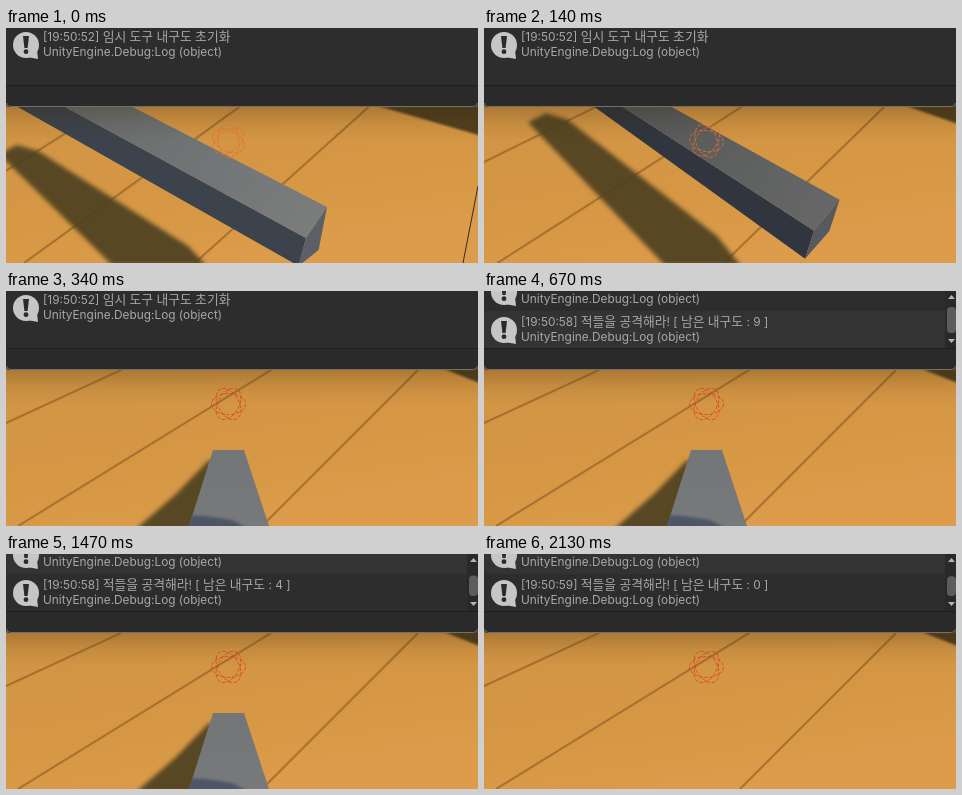
These frames come from a looping animation (472 px wide and 235 px high, 2.81 s). An HTML page with a canvas:

```html
<!DOCTYPE html>
<html lang="ko">
<head>
<meta charset="utf-8">
<style>
html, body { margin: 0; width: 100%; height: 100%; overflow: hidden; background: #2a2a2a; }
canvas { display: block; width: 472px; height: 235px; }
</style>
</head>
<body>
<canvas id="stage" width="472" height="235"></canvas>
<script>
const W = 472, H = 235, TOP = 79, LOOP = 2810;
const SWING_END = 340, BREAK = 2130;
const HIT_TIMES = [670, 880, 1070, 1270, 1470, 1660, 1860, 2010];
const DURABILITY = [9, 7, 6, 5, 4, 2, 1, 0];
const ctx = document.getElementById('stage').getContext('2d');

function poly(fill, ...pts) {
  ctx.beginPath();
  for (const [x, y] of pts) ctx.lineTo(x, y);
  ctx.closePath();
  ctx.fillStyle = fill;
  ctx.fill();
}

function line(x0, y0, x1, y1, color, width) {
  ctx.beginPath();
  ctx.moveTo(x0, y0);
  ctx.lineTo(x1, y1);
  ctx.strokeStyle = color;
  ctx.lineWidth = width;
  ctx.stroke();
}

function disc(x, y, r) {
  ctx.beginPath();
  ctx.arc(x, y, r, 0, 7);
  ctx.fill();
}

function ramp(x0, y0, x1, y1, ...colors) {
  const g = ctx.createLinearGradient(x0, y0, x1, y1);
  colors.forEach((c, i) => g.addColorStop(i / (colors.length - 1), c));
  return g;
}

function softPoly(blur, fill, ...pts) {
  ctx.save();
  ctx.filter = `blur(${blur}px)`;
  poly(fill, ...pts);
  ctx.restore();
}

// Seams squeeze towards the left as the camera turns away.
function floor(turn) {
  ctx.fillStyle = ramp(200, TOP, 225, H, '#d29545', '#d59744', '#dc9c4b');
  ctx.fillRect(0, TOP - 4, W, H - TOP + 4);
  for (const [top, bottom] of [[115, -223], [265, 12], [412, 256]]) {
    const x0 = top * (1 - turn);
    const x1 = bottom * (1 - 2.5 * turn) + 80 * turn;
    line(x0, TOP, x1, H, 'rgba(150,97,38,0.28)', 3);
    line(x0, TOP, x1, H, 'rgba(120,76,30,0.5)', 1.3);
  }
  softPoly(1, '#51401f', [438 - 550 * turn, TOP - 1], [W + 4, TOP - 1], [W + 4, 93 + 125 * turn]);
}

function windowShade() {
  ctx.fillStyle = ramp(0, TOP, 0, TOP + 34, 'rgba(50,30,0,0.24)', 'rgba(50,30,0,0.08)', 'rgba(50,30,0,0)');
  ctx.fillRect(0, TOP - 4, W, 38);
}

// p runs from 0 to 1 over the swing.
function swingBeam(p) {
  const x = 321 + 38 * p, y = 179 - 8 * p, lean = 21 + 5 * p;
  const reach = 1 / (0.000686 + 0.0016 * p * p);
  const slope = 0.515 + 0.1 * p - 0.065 * p * p;
  const vanish = [x - reach, y - reach * slope];
  const right = [x, y], ridge = [x - lean, y + 31];
  const low = [x - 1.35 * lean, y + 59], back = [x - 0.4 * lean, y + 43 - 13 * p];
  const lit = p === 0;

  const tipX = 11 + 56 * p, tipY = 117 - 35 * p;
  softPoly(2, 'rgba(78,64,33,0.92)',
    [tipX - 18, tipY + 9], [tipX, tipY], [tipX + 21, tipY + 6],
    [182 + 56 * p, 218 - 11 * p], [200 + 62 * p, 237], [106 + 82 * p, 237]);
  poly(lit ? '#3d434d' : '#30353f', ridge, low, vanish);
  poly(lit
    ? ramp(90, 79, 310, 195, '#696d6e', '#7a7d7c')
    : ramp(150, 79, 340, 190, '#565959', '#666766'), right, ridge, vanish);
  poly(lit ? '#5b6068' : '#565960', right, back, low, ridge);
}

function restBeam() {
  softPoly(2.2, 'rgba(78,64,33,0.92)', [130, 238], [170, 203], [202, 170], [212, 168], [190, 238]);
  ctx.save();
  poly(ramp(0, 159, 0, H, '#737577', '#78797b'), [207, 159], [238, 159], [263, H], [183, H]);
  ctx.clip();
  softPoly(1.5, '#4c5666', [178, 224], [200, 225], [226, 229], [245, 239], [175, 239]);
  ctx.restore();
}

function gizmo(color, spin, sweep) {
  ctx.save();
  ctx.lineWidth = 0.85;
  ctx.setLineDash([3.5, 1.6]);
  ctx.strokeStyle = color;
  for (let i = 0; i < 3; i++) {
    ctx.beginPath();
    ctx.ellipse(222.5, 113, 17, 10.5, i * Math.PI / 3 + spin, 0, sweep);
    ctx.stroke();
  }
  ctx.restore();
}

function text(str, x, y) {
  ctx.fillStyle = '#a8a8a8';
  for (const run of str.match(/[가-힣]+|[^가-힣]+/g)) {
    ctx.font = /[가-힣]/.test(run)
      ? '12.8px "Noto Sans CJK KR", "Noto Sans CJK", sans-serif'
      : '11.85px Inter, sans-serif';
    ctx.fillText(run, x, y);
    x += ctx.measureText(run).width;
  }
}

function icon(y) {
  ctx.fillStyle = '#c6c6c6';
  disc(20, y, 13);
  poly('#c6c6c6', [31, y + 5], [32, y + 14], [21, y + 12]);
  poly('#2b2b2b', [17, y - 9], [23, y - 9], [21.6, y + 3], [18.4, y + 3]);
  disc(20, y + 6.7, 2.4);
}

function row(y, light, message) {
  ctx.fillStyle = light ? '#333333' : '#2d2d2d';
  ctx.fillRect(0, y, W, 38);
  icon(y + 19);
  text(message, 37, y + 15);
  text('UnityEngine.Debug:Log (object)', 37, y + 30);
}

function hitText(i) {
  return `[19:50:${i < 5 ? 58 : 59}] 적들을 공격해라! [ 남은 내구도 : ${DURABILITY[i]} ]`;
}

function scrollbar(top) {
  ctx.fillStyle = '#292929';
  ctx.fillRect(461, 0, 11, 57);
  poly('#b4b4b4', [464, 8], [471, 8], [467.5, 4]);
  poly('#b4b4b4', [464, 48], [471, 48], [467.5, 52]);
  ctx.fillStyle = '#5c5c5c';
  ctx.beginPath();
  ctx.roundRect(463, top, 9, 42 - top, 4);
  ctx.fill();
}

function panel(t) {
  const frame = new Path2D();
  frame.roundRect(0, -10, W, TOP + 10, 4);
  ctx.save();
  ctx.clip(frame);
  ctx.fillStyle = '#2d2d2d';
  ctx.fillRect(0, 0, W, TOP);
  const hit = HIT_TIMES.filter(start => start <= t).length - 1;
  if (hit < 0) {
    row(-2, false, '[19:50:52] 임시 도구 내구도 초기화');
  } else {
    const odd = DURABILITY[hit] % 2 === 1;
    row(-18, !odd, hitText(Math.max(hit - 1, 0)));
    row(20, odd, hitText(hit));
    scrollbar(23 - 7 / (hit + 1));
  }
  ctx.fillStyle = '#2a2a2a';
  ctx.fillRect(0, 58, W, 21);
  ctx.fillStyle = '#1d1d1d';
  ctx.fillRect(0, 57, W, 1);
  ctx.restore();
  ctx.beginPath();
  ctx.roundRect(0.5, -10, W - 1, TOP + 9.5, 4);
  ctx.save();
  ctx.clip(new Path2D(`M0 ${TOP - 4}h${W}v5h-${W}z`));
  ctx.strokeStyle = '#707070';
  ctx.lineWidth = 1;
  ctx.stroke();
  ctx.restore();
}

function draw(t) {
  const swinging = t < SWING_END;
  if (swinging) {
    // Ease out in a few hard steps.
    const step = Math.floor(t / 67.5);
    const p = step ? 1 - 0.3 ** step : 0;
    floor(0.12 - 0.11 * p * p);
    if (!step) line(472, 158, 457, 235, '#3a2c18', 1);
    swingBeam(p);
    windowShade();
    gizmo('#e5702a', 1.5 * (1 - p), step === 1 ? 2 : 6.28);
  } else {
    floor(0);
    if (t < BREAK) restBeam();
    windowShade();
    gizmo('#d9431f', 0, 6.28);
  }
  panel(t);
}

const begin = performance.now();
function tick() {
  draw((performance.now() - begin) % LOOP);
  requestAnimationFrame(tick);
}
tick();
</script>
</body>
</html>
```
